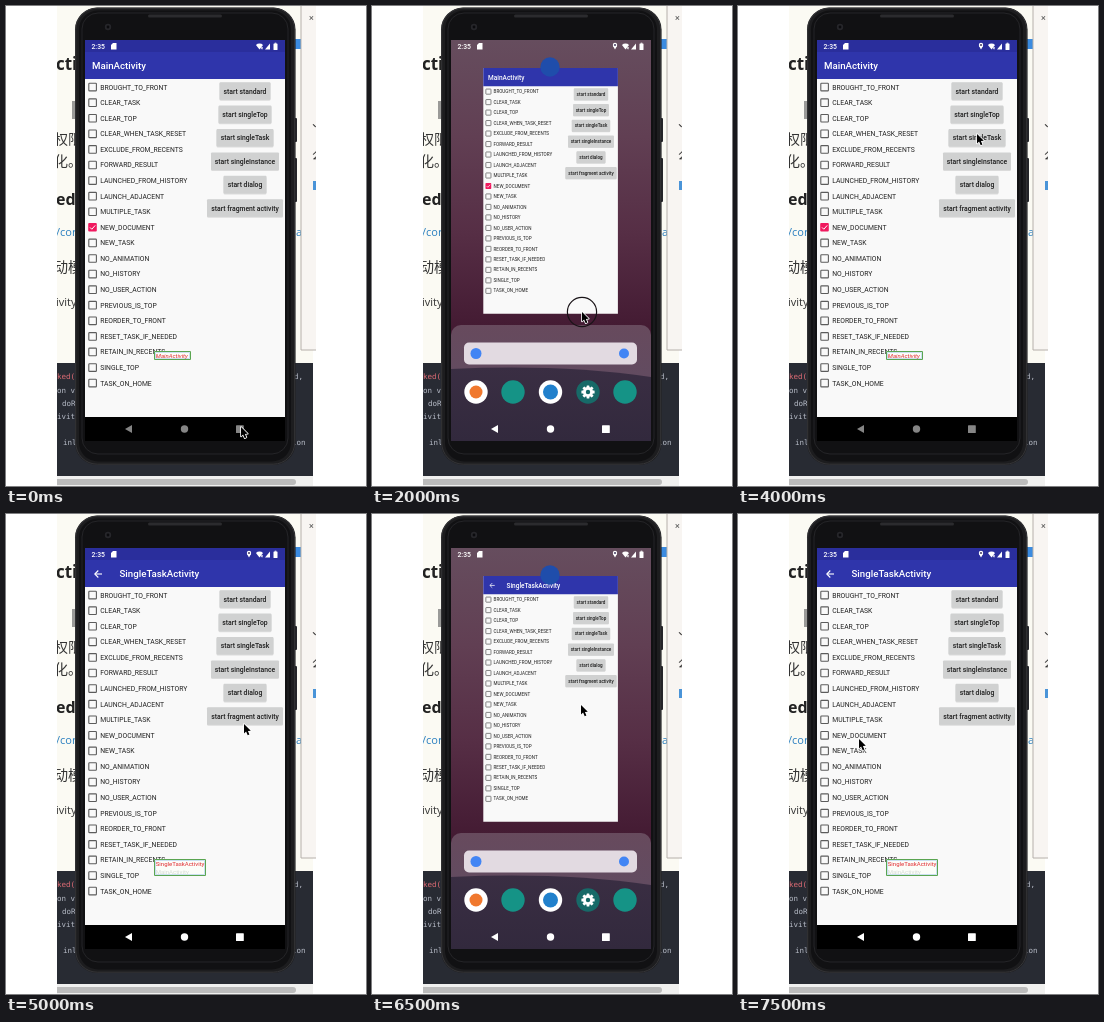
Animation, 360 px wide and 480 px high, one loop 8000 ms. Source, as an HTML page with a canvas:

```html
<!DOCTYPE html>
<html lang="en">
<head>
<meta charset="utf-8">
<title>Task launch flags</title>
<style>
html, body { margin: 0; width: 100%; height: 100%; overflow: hidden; background: #fff; }
canvas { display: block; width: 360px; height: 480px; }
</style>
</head>
<body>
<canvas id="stage"></canvas>
<script>
const canvas = document.getElementById('stage');
const ratio = window.devicePixelRatio || 1;
canvas.width = 360 * ratio;
canvas.height = 480 * ratio;
const ctx = canvas.getContext('2d');

const LOOP = 8000, STEP = 500;
const ROBOTO = 'Roboto, sans-serif';
const CJK = '"Noto Sans CJK SC", "Noto Sans CJK", sans-serif';
const MONO = '"DejaVu Sans Mono", monospace';

const FLAGS = ['BROUGHT_TO_FRONT', 'CLEAR_TASK', 'CLEAR_TOP', 'CLEAR_WHEN_TASK_RESET',
  'EXCLUDE_FROM_RECENTS', 'FORWARD_RESULT', 'LAUNCHED_FROM_HISTORY', 'LAUNCH_ADJACENT',
  'MULTIPLE_TASK', 'NEW_DOCUMENT', 'NEW_TASK', 'NO_ANIMATION', 'NO_HISTORY',
  'NO_USER_ACTION', 'PREVIOUS_IS_TOP', 'REORDER_TO_FRONT', 'RESET_TASK_IF_NEEDED',
  'RETAIN_IN_RECENTS', 'SINGLE_TOP', 'TASK_ON_HOME'];
const BUTTONS = [['standard', 51], ['singleTop', 53], ['singleTask', 57],
  ['singleInstance', 68], ['dialog', 43], ['fragment activity', 76]];

// One state per half second; omitted keys are off.
const STATES = [
  { at: [235, 421], dim: 1, badge: 1 },
  { at: [235, 422], dim: 1, badge: 1 },
  { at: [235, 423], badge: 1, ripple: 1 },
  { at: [227, 390], recents: 1, pin: 1 },
  { at: [210, 306], recents: 1, pin: 1, press: 1 },
  { at: [211, 300], pin: 1 },
  { at: [222, 235], pin: 1, badge: 1 },
  { at: [237, 150], pin: 1, badge: 1, dim: 1 },
  { at: [239, 128], pin: 1, badge: 1, dim: 1 },
  { at: [239, 130], pin: 1, single: 1 },
  { at: [238, 210], pin: 1, single: 1, badge: 1 },
  { at: [234, 370], pin: 1, single: 1, badge: 1 },
  { at: [232, 423], pin: 1, single: 1, ripple: .55 },
  { at: [209, 191], pin: 1, single: 1, recents: 1 },
  { at: [188, 200], pin: 1, single: 1 },
  { at: [121, 225], pin: 1, single: 1, badge: 1 }
];

function rect(x, y, w, h, fill, r = 0) {
  ctx.fillStyle = fill;
  ctx.beginPath();
  ctx.roundRect(x, y, w, h, r);
  ctx.fill();
}

function frame(x, y, w, h, color, width = 1, r = 0) {
  ctx.strokeStyle = color;
  ctx.lineWidth = width;
  ctx.beginPath();
  ctx.roundRect(x, y, w, h, r);
  ctx.stroke();
}

function disc(x, y, r, fill) {
  ctx.fillStyle = fill;
  ctx.beginPath();
  ctx.arc(x, y, r, 0, Math.PI * 2);
  ctx.fill();
}

function poly(points, fill) {
  ctx.fillStyle = fill;
  ctx.beginPath();
  points.forEach(p => ctx.lineTo(...p));
  ctx.closePath();
  ctx.fill();
}

function line(points, color, width) {
  ctx.strokeStyle = color;
  ctx.lineWidth = width;
  ctx.beginPath();
  points.forEach(p => ctx.lineTo(...p));
  ctx.stroke();
}

function text(str, x, y, font, fill, align = 'left') {
  ctx.font = font;
  ctx.fillStyle = fill;
  ctx.textAlign = align;
  ctx.fillText(str, x, y);
}

function gradient(y0, y1, ...colors) {
  const g = ctx.createLinearGradient(0, y0, 0, y1);
  colors.forEach((c, i) => g.addColorStop(i / (colors.length - 1), c));
  return g;
}

function drawPage() {
  ctx.save();
  ctx.beginPath();
  ctx.rect(51, 0, 259, 480);
  ctx.clip();
  rect(51, 0, 256, 480, '#fbfaf3');
  rect(66, 95, 6, 18, '#9a9a98');

  text('cti', 50, 64, 'bold 17px "Open Sans", sans-serif', '#222');
  text('权限', 48, 138, '14px ' + CJK, '#333');
  text('化。', 48, 160, '14px ' + CJK, '#333');
  text('ed', 50, 199, 'bold 16px "Open Sans", sans-serif', '#222');
  text('/core', 50, 230, '11px "Open Sans", sans-serif', '#2a7fc0');
  text('动模', 48, 266, '14px ' + CJK, '#333');
  text('ivity', 50, 300, '11px "Open Sans", sans-serif', '#333');

  rect(288, 33, 7, 10, '#3b8be0');
  text('a', 290, 230, '11px "Open Sans", sans-serif', '#2a7fc0');

  rect(295, 0, 15, 344, '#f8f5f2');
  line([[310, 344], [295, 344], [295, 0]], '#b5b0aa', 1);
  text('×', 303, 15, '9px ' + ROBOTO, '#555');
  text('、', 306, 121, '12px ' + CJK, '#333');
  text('么', 306, 154, '12px ' + CJK, '#333');
  rect(307, 175, 3, 9, '#4a94d8');

  rect(51, 357, 256, 113, '#282b33');
  const mono = '7.5px ' + MONO;
  text('ked(', 51, 373, mono, '#e06c75');
  text('on vo', 51, 387, mono, '#b8bdc8');
  text('doR', 56, 400, mono, '#b8bdc8');
  text('ivit', 51, 413, mono, '#b8bdc8');
  text('inl', 57, 439, mono, '#b8bdc8');
  text('d,', 288, 373, mono, '#b8bdc8');
  text('lon', 286, 439, mono, '#b8bdc8');

  rect(51, 470, 256, 10, '#f0f0ef');
  rect(45, 473, 245, 6, '#bcbcbc', 3);
  ctx.restore();
}

function drawBody() {
  rect(288, 112, 3, 24, '#25252a', 1);
  rect(288, 152, 3, 44, '#25252a', 1);
  rect(69, 1.5, 220.5, 457.5, '#1d1d1f', 22);
  frame(69.7, 2.2, 219, 456, '#353538', 1, 21.5);
  rect(73, 4.5, 212, 451, '#111113', 19);
  frame(76, 7, 206, 441, '#252528', 1, 16);
  rect(79, 34, 200, 401, '#000');
  rect(142, 8.5, 74, 3, '#2b2b2e', 1.5);
  disc(102, 21, 3.2, '#26262a');
  disc(102, 21, 1.4, '#0b0b0e');
}

function drawStatus(pin) {
  text('2:35', 85.5, 43, '500 6.8px ' + ROBOTO, '#fff');
  poly([[107, 37], [110.5, 37], [110.5, 43.5], [105, 43.5], [105, 39]], '#fff');
  if (pin) {
    poly([[241, 39.9], [245, 39.9], [243, 43.5]], '#fff');
    disc(243, 39, 2.2, '#fff');
    disc(243, 39, 1.1, '#50476a');
  }
  ctx.fillStyle = '#fff';
  ctx.beginPath();
  ctx.moveTo(253.5, 43.5);
  ctx.arc(253.5, 42.5, 5, Math.PI * 1.25, Math.PI * 1.75);
  ctx.fill();
  text('×', 254.5, 44, 'bold 5px ' + ROBOTO, '#fff');
  poly([[259, 43.5], [264, 43.5], [264, 37.5]], '#fff');
  rect(267.5, 37.5, 4, 6.5, '#fff', .6);
  rect(268.7, 36.7, 1.6, 1, '#fff');
}

function drawApp(single) {
  rect(79, 46, 200, 365, '#f9f9f9');
  rect(79, 46, 200, 27, '#2f35ab');
  if (single) {
    line([[96, 60], [89, 60]], '#fff', 1.1);
    line([[92.3, 56.5], [88.8, 60], [92.3, 63.5]], '#fff', 1.1);
  }
  text(single ? 'SingleTaskActivity' : 'MainActivity', single ? 113.5 : 86, 63.2,
    '500 9.7px ' + ROBOTO, '#fff');

  FLAGS.forEach((name, i) => {
    const y = 81 + i * 15.58;
    if (i === 9 && !single) {
      rect(82.2, y - 4.2, 8.6, 8.6, '#f0195f', 1);
      line([[84, y + .2], [85.8, y + 2], [89.2, y - 1.8]], '#fff', 1);
    } else {
      frame(82.8, y - 3.7, 7.6, 7.6, '#5c5c5c', 1.1, .7);
    }
    text(name, 94.2, y + 2.5, '6.8px ' + ROBOTO, '#202020');
  });

  BUTTONS.forEach(([name, w], i) => {
    const y = 85 + i * 23.4;
    rect(239 - w / 2, y - 8.2, w, 18, 'rgba(0,0,0,.12)', 1.5);
    rect(239 - w / 2, y - 8.8, w, 17.6, '#d0d1d1', 1);
    text('start ' + name, 239, y + 2.5, '500 6.8px ' + ROBOTO, '#1c1c1c', 'center');
  });
}

function drawBadge(single) {
  const w = single ? 52 : 37, h = single ? 17 : 9;
  rect(148, 345, w, h, '#fbfdf9');
  frame(148.5, 345.5, w - 1, h - 1, '#5aa551', 1);
  frame(149.5, 346.5, w - 3, h - 3, '#a9cdec', .6);
  const font = (single ? '' : 'italic ') + '6px ' + ROBOTO;
  text(single ? 'SingleTaskActivity' : 'MainActivity', 149.8, 351.9, font, '#e0282c');
  if (single) text('MainActivity', 149.8, 359.6, font, '#d5dcd5');
}

function drawGear(x, y) {
  disc(x, y, 11.7, '#176a68');
  for (let i = 0; i < 8; i++) {
    ctx.save();
    ctx.translate(x, y);
    ctx.rotate(i * Math.PI / 4);
    rect(-1.4, -6.6, 2.8, 3, '#fff', .5);
    ctx.restore();
  }
  disc(x, y, 5, '#fff');
  disc(x, y, 2.2, '#176a68');
}

function drawWallpaper() {
  rect(79, 34, 200, 401, gradient(34, 325, '#664d5e', '#613f53', '#562e45', '#431a32'));
  rect(79, 319, 200, 116, gradient(319, 370, '#674a5d', '#624b60'), [10, 10, 0, 0]);
  ctx.fillStyle = gradient(360, 435, '#3a2e43', '#32293d');
  ctx.beginPath();
  ctx.moveTo(79, 363);
  ctx.quadraticCurveTo(190, 358, 279, 371);
  ctx.lineTo(279, 435);
  ctx.lineTo(79, 435);
  ctx.fill();
}

function drawRecents(single) {
  drawWallpaper();
  ctx.save();
  ctx.translate(111.3, 62);
  ctx.scale(.673, .673);
  ctx.translate(-79, -46);
  drawApp(single);
  ctx.restore();
  disc(178, 61, 9.7, '#1f4dab');

  rect(92, 336.5, 173, 22, '#e2dae1', 5);
  disc(104, 347.5, 5.5, '#4285f4');
  disc(252, 347.5, 5, '#4285f4');

  disc(104, 386, 11.7, '#fff');
  disc(104, 386, 6.5, '#f0782e');
  disc(141, 386, 11.7, '#159386');
  disc(178.5, 386, 11.7, '#fff');
  disc(178.5, 386, 7.5, '#2180cc');
  drawGear(216, 386);
  disc(253, 386, 11.7, '#159386');
}

function drawNav({ recents, dim, ripple }) {
  if (!recents) rect(79, 411, 200, 24, '#000');
  if (ripple) {
    ctx.globalAlpha = ripple;
    rect(209, 411.5, 50, 23, '#2b2b2b', 11.5);
    ctx.globalAlpha = 1;
  }
  const color = dim ? '#858585' : '#fff';
  poly([[119, 423], [126, 419], [126, 427]], color);
  disc(178.5, 423, 3.7, color);
  rect(230, 419.2, 7.8, 7.8, color, .6);
}

function drawCursor([x, y], press) {
  if (press) {
    ctx.strokeStyle = '#1a1418';
    ctx.lineWidth = 1.2;
    ctx.beginPath();
    ctx.arc(x, y, 14.6, 0, Math.PI * 2);
    ctx.stroke();
  }
  const arrow = [[0, 0], [0, 9.5], [2.1, 7.6], [3.7, 11.2], [5.4, 10.4], [3.9, 6.9], [6.8, 6.7]];
  const points = arrow.map(([dx, dy]) => [x + dx, y + dy]);
  ctx.lineJoin = 'round';
  line([...points, points[0], points[1]], '#fff', 1.6);
  poly(points, '#000');
  ctx.lineJoin = 'miter';
}

function draw(time) {
  const s = STATES[Math.floor(time % LOOP / STEP)];
  ctx.setTransform(ratio, 0, 0, ratio, 0, 0);
  rect(0, 0, 360, 480, '#fff');
  drawPage();
  drawBody();
  if (s.recents) {
    drawRecents(s.single);
  } else {
    rect(79, 34, 200, 12, '#2a2e9c');
    drawApp(s.single);
    if (s.badge) drawBadge(s.single);
  }
  drawStatus(s.pin);
  drawNav(s);
  drawCursor(s.at, s.press);
}

const start = performance.now();
function tick() {
  draw(performance.now() - start);
  requestAnimationFrame(tick);
}
tick();
</script>
</body>
</html>
```
